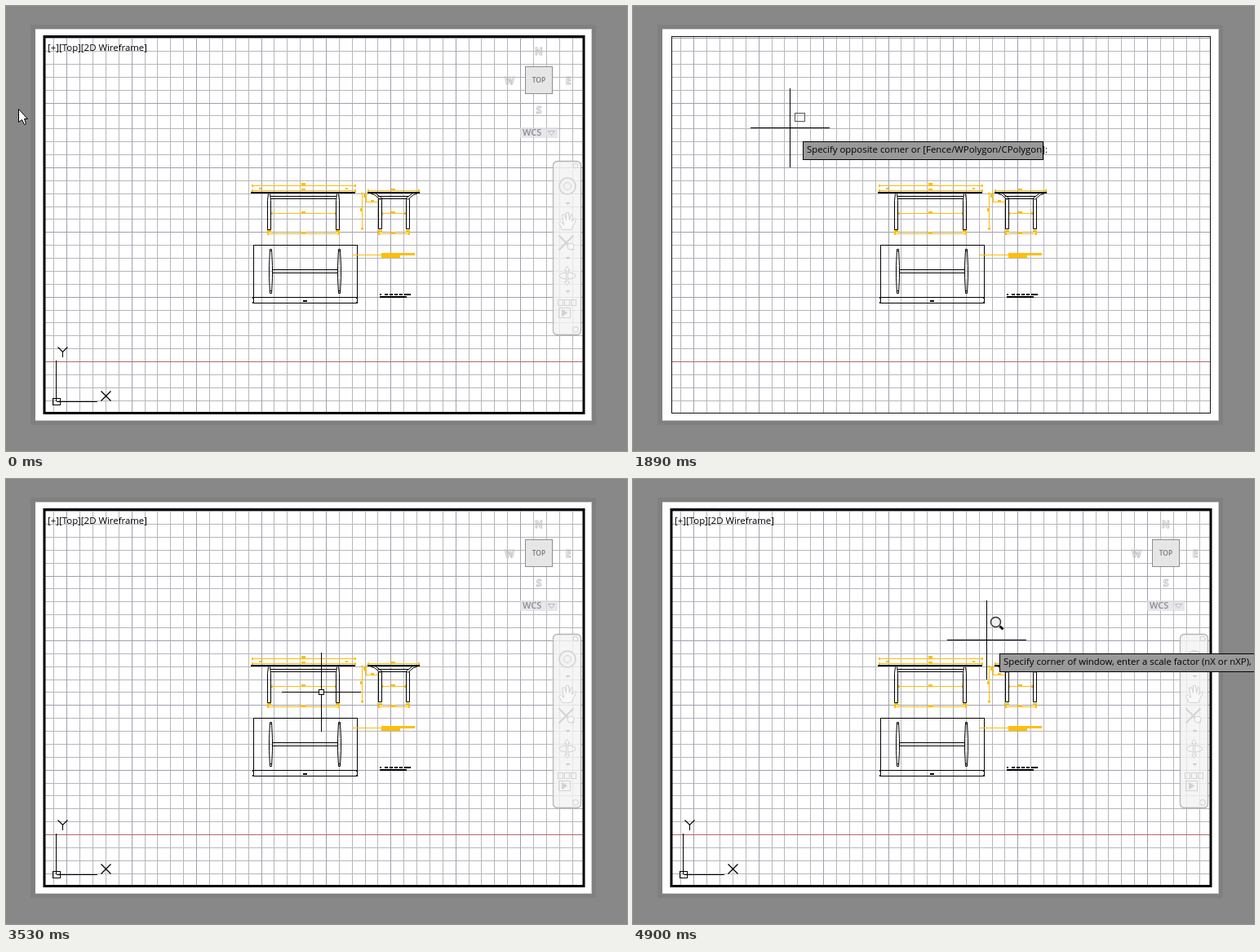
These frames come from a looping animation (761x546 px, 8000 ms). An HTML page with a canvas:

```html
<!DOCTYPE html>
<html>
<head>
<meta charset="utf-8">
<style>
  html, body { margin: 0; width: 100%; height: 100%; overflow: hidden; background: #888; }
  canvas { display: block; }
</style>
</head>
<body>
<canvas id="stage" width="761" height="546"></canvas>
<script>
const ctx = document.getElementById('stage').getContext('2d');
const LOOP = 8000, GOLD = '#ffbe0a', FONT = '"Open Sans", sans-serif';

// Crosshair stops: start time, x, y
const stops = [
  [250, 15, 125], [1340, 59, 128], [1460, 192, 149], [3140, 193, 149],
  [3290, 236, 174], [3410, 326, 227], [3530, 386, 261], [3680, 370, 246],
  [3800, 432, 198], [3950, 433, 197]
];

function fill(color, x, y, w, h) {
  ctx.fillStyle = color;
  ctx.fillRect(x, y, w, h);
}
function frame(color, x, y, w, h, width = 1) {
  ctx.strokeStyle = color;
  ctx.lineWidth = width;
  ctx.strokeRect(x + .5, y + .5, w, h);
}
function path(color, points, { close = false, inside, width = 1 } = {}) {
  ctx.beginPath();
  for (let i = 0; i < points.length; i += 2) ctx.lineTo(points[i] + .5, points[i + 1] + .5);
  if (close) ctx.closePath();
  if (inside) { ctx.fillStyle = inside; ctx.fill(); }
  ctx.strokeStyle = color;
  ctx.lineWidth = width;
  ctx.stroke();
}
function circle(color, x, y, r, inside, width = 1) {
  ctx.beginPath();
  ctx.arc(x, y, r, 0, 7);
  if (inside) { ctx.fillStyle = inside; ctx.fill(); }
  ctx.strokeStyle = color;
  ctx.lineWidth = width;
  ctx.stroke();
}
function text(string, x, y, size = 11.4, color = '#000', align = 'left', weight = '') {
  ctx.font = `${weight} ${size}px ${FONT}`;
  ctx.textAlign = align;
  ctx.fillStyle = color;
  ctx.fillText(string, x, y);
}
const hline = (color, x1, x2, y) => fill(color, x1, y, x2 - x1, 1);
const vline = (color, x, y1, y2) => fill(color, x, y1, 1, y2 - y1);

function drawPaper() {
  fill('#888', 0, 0, 761, 546);
  fill('#808080', 30, 23, 693, 491);
  fill('#cfcfcf', 36, 28, 682, 481);
  fill('#fff', 36, 29, 681, 479);
  for (const major of [false, true]) {
    const color = major ? '#a0a0b0' : '#b7b7bc';
    for (let k = -16; k <= 25; k++) {
      if ((k % 5 === 0) !== major) continue;
      const x = Math.floor(313 + k * 15.88), y = Math.floor(436.6 - k * 15.88);
      if (x < 707) vline(color, x, 38, 499);
      if (y < 499) hline(color, 48, 707, y);
    }
  }
  hline('#b5686c', 48, 707, 436);
}

// Horizontal dimension with end ticks and a small label block
function dimension(x1, x2, y, label) {
  hline(GOLD, x1, x2, y);
  fill(GOLD, x1, y - 1, 2, 3);
  fill(GOLD, x2 - 2, y - 1, 2, 3);
  if (label) fill(GOLD, label - 2, y - 2, 5, 3);
}

function drawFrontView() {
  dimension(301, 429, 220, 364);
  dimension(301, 429, 226, 364);
  for (const x of [310, 416]) fill(GOLD, x, 223, 3, 2);
  fill(GOLD, 362, 217, 5, 3);
  dimension(325, 405, 254, 364);
  dimension(320, 409, 279, 364);
  fill('#000', 300, 228, 128, 2);
  hline('#000', 324, 405, 233);
  hline('#000', 324, 405, 236);
  for (const x of [320, 404]) {
    path('#000', [x + 1, 230, x, 238, x, 274, x + 4, 274, x + 4, 238, x + 3, 230]);
    fill(GOLD, x, 275, 5, 3);
  }
}

function drawSideView() {
  dimension(443, 507, 226, 474);
  dimension(460, 490, 254, 474);
  dimension(456, 495, 279, 474);
  vline(GOLD, 436, 229, 275);
  fill(GOLD, 435, 229, 3, 2);
  fill(GOLD, 435, 272, 3, 2);
  fill(GOLD, 434, 248, 3, 4);
  vline(GOLD, 441, 229, 241);
  hline(GOLD, 441, 456, 240);
  fill(GOLD, 438, 231, 4, 4);
  fill(GOLD, 447, 238, 4, 3);
  fill('#000', 443, 228, 64, 2);
  hline('#000', 456, 494, 233);
  hline('#000', 458, 492, 236);
  for (const side of [-1, 1]) {
    const at = d => 475 + side * d;
    path('#000', [at(28), 230, at(24), 231, at(17), 237, at(15), 235, at(22), 230]);
    path('#000', [at(19), 236, at(19), 273, at(15), 273, at(15), 236]);
    fill(GOLD, at(17) - 2, 275, 5, 3);
  }
}

function drawPlanView() {
  frame('#000', 303, 293, 127, 71);
  hline('#000', 303, 430, 357);
  fill('#000', 364, 361, 5, 2);
  for (const y of [357, 363]) for (const x of [302, 429]) fill('#000', x, y, 2, 2);
  hline('#000', 327, 406, 323);
  hline('#000', 327, 406, 327);
  for (const x of [324, 408]) {
    path('#000', [x - 1, 298, x + 1, 298, x + 2, 318, x + 2, 333, x + 1, 352,
      x - 1, 352, x - 2, 333, x - 2, 318], { close: true });
    fill('#000', x - 1, 300, 3, 1);
    fill('#000', x - 1, 349, 3, 1);
  }
}

function drawNotes() {
  hline(GOLD, 425, 501, 305);
  fill(GOLD, 460, 303, 41, 3);
  fill(GOLD, 460, 306, 23, 3);
  for (let x = 458; x < 490; x += 6) fill('#000', x, 353, x > 458 ? 4 : 2, 2);
  fill('#000', 488, 353, 8, 2);
  fill('#000', 458, 356, 33, 2);
}

function drawViewCube() {
  ctx.lineWidth = 1;
  ctx.strokeStyle = '#c2c2c6';
  ctx.textAlign = 'center';
  ctx.font = `bold 12px ${FONT}`;
  for (const [letter, x, y] of [['N', 653, 60], ['W', 617, 96], ['E', 689, 96], ['S', 653, 132]])
    ctx.strokeText(letter, x, y);
  fill('#e6e6e6', 636, 74, 33, 33);
  frame('#8e8e8e', 636, 74, 33, 33);
  text('TOP', 653, 94, 8.5, '#777', 'center', '600');
  fill('rgba(222,222,228,.75)', 630, 149, 46, 13);
  text('WCS', 633, 159, 11, '#8b8b90', 'left', '600');
  path('#b8b8be', [664, 153, 672, 153, 668, 158], { close: true, inside: '#eee' });
}

function drawNavBar() {
  const ink = '#d2d2d2';
  ctx.beginPath();
  ctx.roundRect(670.5, 190.5, 34, 213, 5);
  ctx.fillStyle = 'rgba(243,243,243,.8)';
  ctx.fill();
  ctx.strokeStyle = '#b4b4b6';
  ctx.lineWidth = 1.3;
  ctx.stroke();
  circle(ink, 698, 196, 3);
  circle(ink, 698, 397, 3.5);
  circle(ink, 688, 221, 10, '#f3f3f3', 1.5);
  circle(ink, 688, 221, 4.5);
  path(ink, [681, 274, 677, 266, 679, 264, 683, 268, 681, 256, 684, 255, 686, 262, 686, 253,
    689, 253, 690, 262, 692, 255, 694, 256, 693, 264, 697, 260, 698, 262, 692, 274],
    { close: true, inside: '#f8f8f8' });
  path(ink, [677, 281, 695, 299], { width: 2 });
  path(ink, [695, 281, 677, 299], { width: 2 });
  circle(ink, 692, 295, 4, '#f8f8f8');
  ctx.beginPath();
  ctx.ellipse(688, 331, 10, 4, 0, 0, 7);
  ctx.stroke();
  path(ink, [684, 324, 687, 319, 690, 324, 688, 324, 688, 338, 690, 338, 687, 342, 684, 338, 686, 338, 686, 324],
    { close: true, inside: '#f8f8f8' });
  for (const x of [676, 684, 692]) frame(ink, x, 360, 6, 7);
  frame(ink, 677, 370, 14, 12);
  path(ink, [681, 372, 687, 376, 681, 380], { close: true, inside: ink });
  for (const y of [241, 308, 349]) path('#c4c4c4', [686, y, 690, y, 688, y + 2], { close: true });
}

function drawAxes() {
  vline('#000', 61, 435, 485);
  hline('#000', 62, 112, 485);
  frame('#000', 57, 481, 9, 8);
  path('#000', [63, 418, 69, 424, 75, 418], { width: 1.2 });
  vline('#000', 69, 424, 431);
  path('#000', [116, 472, 128, 484], { width: 1.2 });
  path('#000', [128, 472, 116, 484], { width: 1.2 });
}

function drawActiveViewport() {
  text('[+][Top][2D Wireframe]', 51, 55);
  drawViewCube();
  drawNavBar();
  drawAxes();
  frame('#000', 46.5, 37, 661, 462, 3);
}

function drawCrosshair(x, y, pickbox) {
  const gap = pickbox ? 3 : 0;
  hline('#000', x - 48, x - gap, y);
  hline('#000', x + gap, x + 49, y);
  vline('#000', x, y - 48, y - gap);
  vline('#000', x, y + gap, y + 49);
  if (pickbox) frame('#000', x - 3, y - 3, 6, 6);
}

function drawArrow(x, y) {
  const shape = [0, 0, 0, 16, 4, 13, 7, 19, 9, 18, 7, 12, 11, 12];
  path('#000', shape.map((v, i) => v + (i % 2 ? y : x)), { close: true, inside: '#fff' });
}

function drawPrompt(string, x, y, width) {
  fill('#999', x, y, width, 22);
  frame('#000', x, y, width, 22);
  text(string, x + 5, y + 14);
}

function drawInput(ready) {
  fill(ready ? '#fff' : 'rgba(255,255,255,.7)', 449, 214, 43, 20);
  frame(ready ? '#222' : '#999', 449, 214, 42, 19);
  if (!ready) return;
  text('z', 454, 229);
  vline('#000', 459, 217, 231);
}

function drawMagnifier() {
  path('#111', [449, 180, 453, 184], { width: 3 });
  circle('#333', 444.5, 175.5, 6, 'rgba(240,240,240,.9)', 1.5);
}

function draw(t) {
  const active = t < 250 || t >= 2170;
  const hovering = t >= 1340 && t < 1460;
  const selecting = t >= 1890 && t < 2170;
  const typing = t >= 4350 && t < 4780;
  const zooming = t >= 4780;

  drawPaper();
  drawFrontView();
  drawSideView();
  drawPlanView();
  drawNotes();

  if (active) drawActiveViewport();
  else {
    if (hovering) {
      frame('#c4c4c4', 46.5, 37, 661, 462, 5);
      frame('#707070', 46.5, 37, 661, 462, 3);
    }
    frame('#111', 47, 37, 660, 462, hovering ? 2 : 1);
  }

  const stop = stops.findLast(s => s[0] <= t);
  if (stop) drawCrosshair(stop[1], stop[2], !selecting && !zooming);
  else drawArrow(15, 126);

  if (selecting) {
    frame('#555', 198, 131, 12, 10);
    drawPrompt('Specify opposite corner or [Fence/WPolygon/CPolygon]:', 208, 166, 294);
  }
  if (typing) {
    drawInput(t >= 4500);
    drawArrow(433, 198);
  }
  if (zooming) drawMagnifier();
  if (t >= 4900) drawPrompt('Specify corner of window, enter a scale factor (nX or nXP), or', 449, 214, 330);
}

function tick() {
  draw(performance.now() % LOOP);
  requestAnimationFrame(tick);
}
tick();
</script>
</body>
</html>
```
